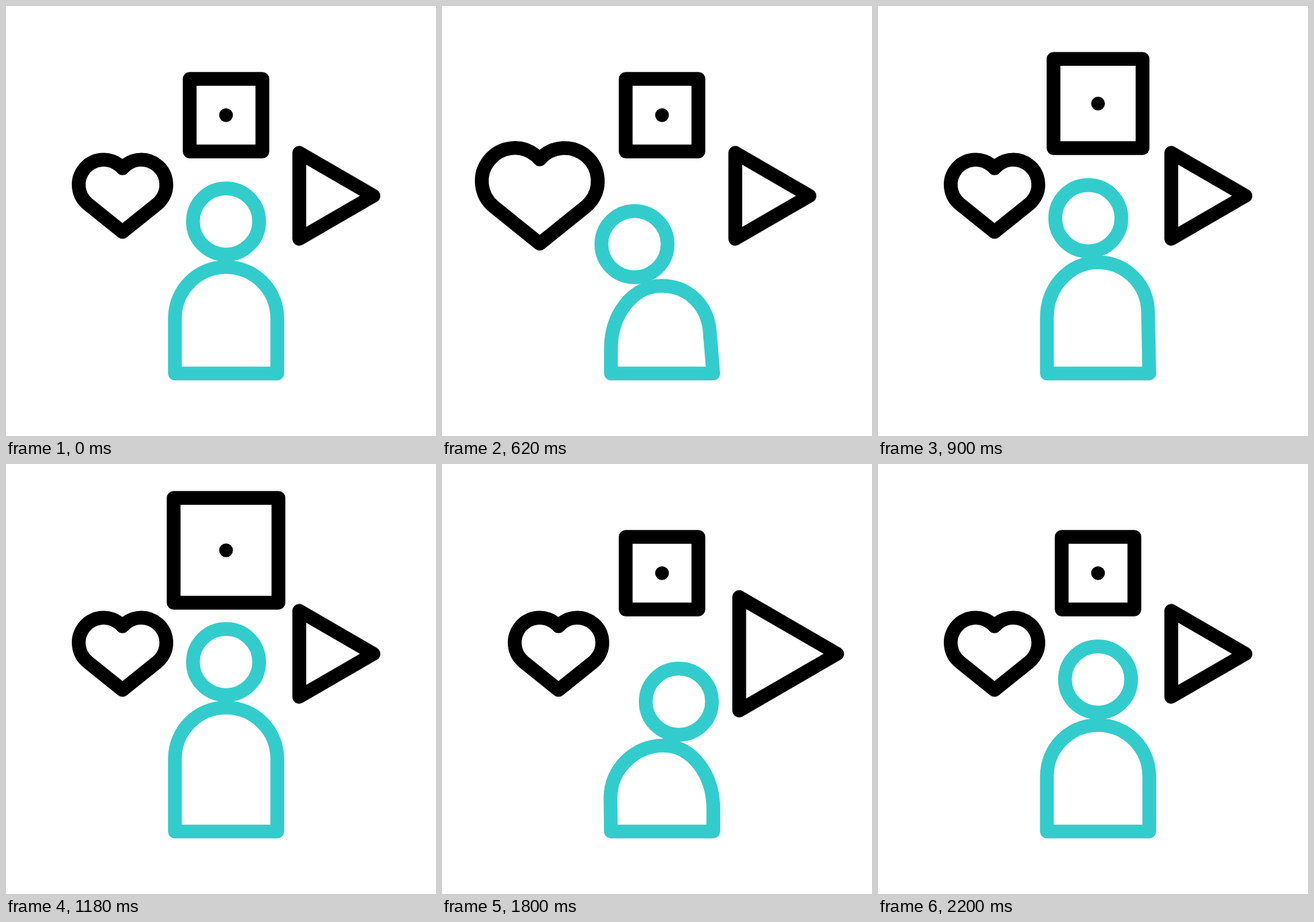
Recreate the animation shown at these times as an HTML page with a canvas. Size 640 by 640 pixels, loop 2.4 s.

```html
<!DOCTYPE html>
<html lang="en">
<head>
<meta charset="utf-8">
<title>Person and shapes</title>
<style>
html, body { margin: 0; width: 100%; height: 100%; overflow: hidden; background: #fff; }
canvas { display: block; width: 100vmin; height: 100vmin; }
</style>
</head>
<body>
<canvas id="stage" width="640" height="640"></canvas>
<script>
const ctx = document.getElementById('stage').getContext('2d');
const LOOP = 2400, TICK = 20, WIDTH = 20.5;
const BLACK = '#000', TEAL = '#33cccc';

// Offsets from the resting pose: head, left shoulder, top, right shoulder,
// then the change in length of the left and right shoulder handles.
const REST  = [0, 0, 0, 0, 0, 0, 0, 0, 0, 0];
const LEFT  = [-41, 33.8, 0, 46, -1, 28, -5, 22, 10, -3];
const UP    = [0, -26, 0, -26, 0, -26, 0, -26, 0, 0];
const RIGHT = [25, 33, -0.6, 32, 2, 30.5, 0.2, 50, 1, 11];

// Moves of the person in ticks: start, end, pose reached.
const MOVES = [
  [10, 22, LEFT],
  [36, 50, UP],
  [66.5, 78.6, RIGHT],
  [96, 110, REST]
];

const ramp = (k, a, b) => Math.min(1, Math.max(0, (k - a) / (b - a)));
const pulse = (k, a, b, c, d) => ramp(k, a, b) - ramp(k, c, d);

function poseAt(k) {
  let pose = REST;
  for (const [a, b, next] of MOVES) {
    const p = ramp(k, a, b);
    pose = pose.map((v, i) => v + (next[i] - v) * p);
  }
  return pose;
}

function stroke(color) {
  ctx.strokeStyle = color;
  ctx.lineWidth = WIDTH;
  ctx.lineJoin = 'round';
  ctx.stroke();
}

function disc(x, y, r) {
  ctx.beginPath();
  ctx.arc(x, y, r, 0, Math.PI * 2);
}

// Builds a path around a scaled and shifted centre; the line keeps its weight.
function scaled(x, y, scale, build) {
  ctx.save();
  ctx.translate(x, y);
  ctx.scale(scale, scale);
  ctx.beginPath();
  build();
  ctx.closePath();
  ctx.restore();
  stroke(BLACK);
}

function heart(g) {
  scaled(173.4 - 32.1 * g, 282.5, 1 + 0.373 * g, () => {
    const r = 37.2, notch = 0.719, side = 2.25;
    ctx.moveTo(0, 53.8);
    ctx.arc(-28, -16.5, r, side, Math.PI * 2 - notch);
    ctx.arc(28, -16.5, r, Math.PI + notch, Math.PI * 3 - side);
  });
}

function square(g) {
  const x = 327.5, y = 162.5 - 38.6 * g;
  scaled(x, y, 1 + 0.5 * g, () => ctx.rect(-54.1, -54.1, 108.2, 108.2));
  disc(x, y, 10.25);
  ctx.fillStyle = BLACK;
  ctx.fill();
}

function triangle(g) {
  scaled(491.75 + 26 * g, 282.5, 1 + 0.353 * g, () => {
    ctx.moveTo(-55.25, -64);
    ctx.lineTo(55.25, 0);
    ctx.lineTo(-55.25, 64);
  });
}

function person(pose) {
  const [hx, hy, lx, ly, tx, ty, rx, ry, lh, rh] = pose;
  const base = 547, arm = 42;
  const l = [251.4 + lx, 464.5 + ly];
  const t = [327.5 + tx, 388.4 + ty];
  const r = [403.7 + rx, 464.5 + ry];

  ctx.beginPath();
  ctx.moveTo(251.4, base);
  ctx.lineTo(l[0], l[1]);
  ctx.bezierCurveTo(l[0], l[1] - arm - lh, t[0] - arm, t[1], t[0], t[1]);
  ctx.bezierCurveTo(t[0] + arm, t[1], r[0] + rx * 0.5, r[1] - arm - rh, r[0], r[1]);
  ctx.lineTo(403.7, base);
  ctx.closePath();
  stroke(TEAL);

  disc(327.5 + hx, 320.7 + hy, 49.25);
  stroke(TEAL);
}

function draw(now) {
  const k = (now % LOOP) / TICK;
  ctx.fillStyle = '#fff';
  ctx.fillRect(0, 0, 640, 640);
  heart(pulse(k, 10, 19, 30, 38));
  square(pulse(k, 41, 50, 58, 67));
  triangle(pulse(k, 71, 82, 89, 100));
  person(poseAt(k));
  requestAnimationFrame(draw);
}

draw(performance.now());
</script>
</body>
</html>
```
